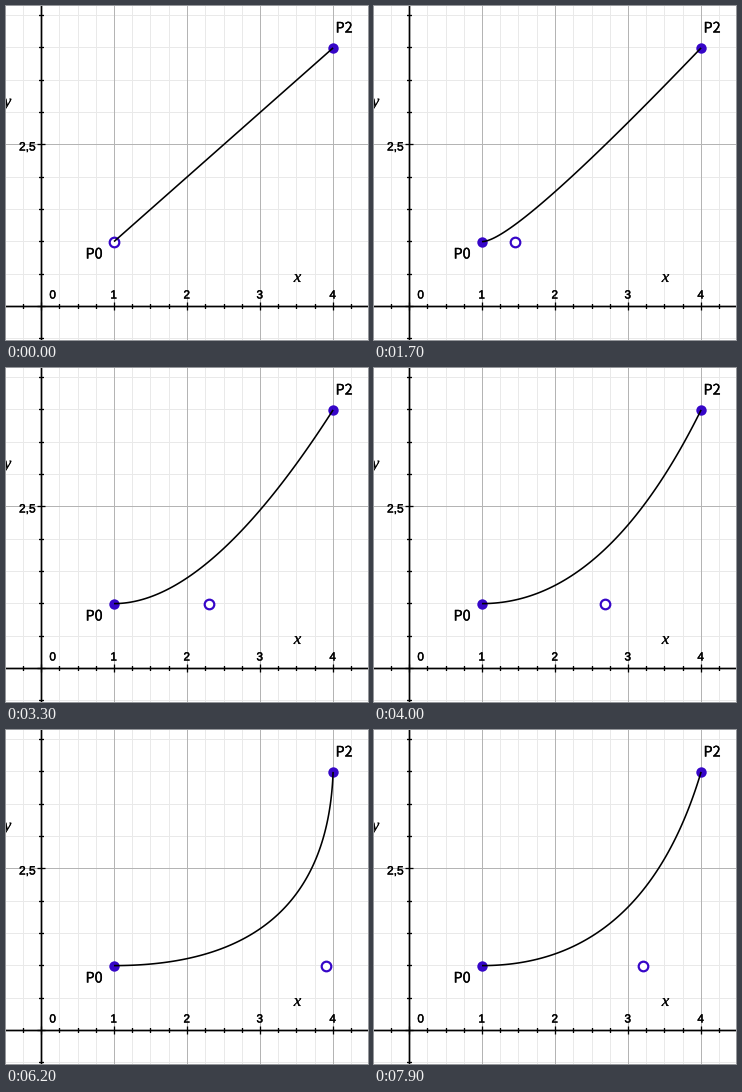
A matplotlib script that plays this animation: 362x334 px, repeating every 8000 ms.

```python
import numpy as np
import matplotlib.pyplot as plt
from matplotlib.animation import FuncAnimation
from matplotlib.patheffects import withStroke

WIDTH, HEIGHT, DPI = 362, 334, 100
PX = 72 / DPI                      # one pixel in points
FRAMES, INTERVAL = 80, 100
ORIGIN = np.array([35, 300])
UNIT = np.array([73, -64.67])
INK = "#3606c8"
MAJOR, MINOR = "#b4b4b4", "#e9e9e9"

# Whole-number coordinates fall on pixel centres.
fig = plt.figure(figsize=(WIDTH / DPI, HEIGHT / DPI), dpi=DPI, facecolor="white")
ax = fig.add_axes([0, 0, 1, 1])
ax.set_xlim(-0.5, WIDTH - 0.5)
ax.set_ylim(HEIGHT - 0.5, -0.5)
ax.axis("off")


def to_pixels(x, y):
    return ORIGIN + UNIT * (x, y)


def line(xs, ys, color="black", width=1.0, z=1):
    return ax.plot(xs, ys, color=color, lw=width * PX, zorder=z,
                   solid_capstyle="butt", snap=False)[0]


def label(x, y, text, size, font="Liberation Sans", align="center",
          weight=0.4, **style):
    ax.text(x, y, text, fontsize=size * PX, family=font, ha=align,
            va="baseline", zorder=6,
            path_effects=[withStroke(linewidth=weight * PX, foreground="black")],
            **style)


def dot(x, y, diameter, fill, edge=0):
    return ax.plot([x], [y], "o", ms=diameter * PX, mfc=fill, mec=INK,
                   mew=edge * PX, zorder=4, snap=False)[0]


def draw_grid():
    x0, y0 = ORIGIN
    for i in range(-1, 18):
        x = round(to_pixels(i / 4, 0)[0])
        major = i % 4 == 0
        line([x, x], [-1, HEIGHT], MAJOR if major else MINOR, z=2 if major else 1)
        reach = 4 if major else 2.5
        line([x, x], [y0 - reach, y0 + reach], width=1.3, z=3)
    for j in range(-1, 10):
        y = round(to_pixels(0, j / 2)[1])
        major = j % 5 == 0
        line([-1, WIDTH], [y, y], MAJOR if major else MINOR, z=2 if major else 1)
        reach = 4 if major else 2.5
        line([x0 - reach, x0 + reach], [y, y], width=1.3, z=3)
    line([-1, WIDTH], [y0, y0], width=1.7, z=3)
    line([x0, x0], [-1, HEIGHT], width=1.7, z=3)


def draw_labels():
    label(46.2, 292, "0", 11.8)
    for n in range(1, 5):
        label(to_pixels(n, 0)[0] - 0.8, 292, str(n), 11.8)
    label(12.5, 144, "2,5", 12, align="left")
    label(291, 275.5, "x", 17, "Liberation Serif", weight=0.1, style="italic")
    label(1, 100, "y", 17, "Liberation Serif", weight=0.1, style="italic")
    label(79, 252, "P0", 14.4, "Noto Sans CJK JP", "left", 0.3)
    label(329, 26, "P2", 14.4, "Noto Sans CJK JP", "left", 0.3)


draw_grid()
draw_labels()

START = np.array([107.5, 235.1])
END = np.array([326.6, 41.4])
dot(*START, 10.4, INK)
dot(*END, 10.4, INK)
handle = dot(*START, 9.6, "white", 2.2)
curve = line([], [], width=1.6, z=5)
T = np.linspace(0, 1, 120)[:, None]


def handle_x(frame):
    """Rest, glide right at a steady pace, then turn back."""
    return np.interp(frame, [7.8, 17, 33, 62, 64, 79],
                     [START[0], 140.7, 202.5, 319.7, END[0], 268.7])


def update(frame):
    control = np.array([handle_x(frame), START[1]])
    points = (1 - T) ** 2 * START + 2 * T * (1 - T) * control + T ** 2 * END
    curve.set_data(points[:, 0], points[:, 1])
    handle.set_data([control[0]], [control[1]])
    return curve, handle


anim = FuncAnimation(fig, update, frames=FRAMES, interval=INTERVAL,
                     repeat=True, repeat_delay=0)
plt.show()
```
